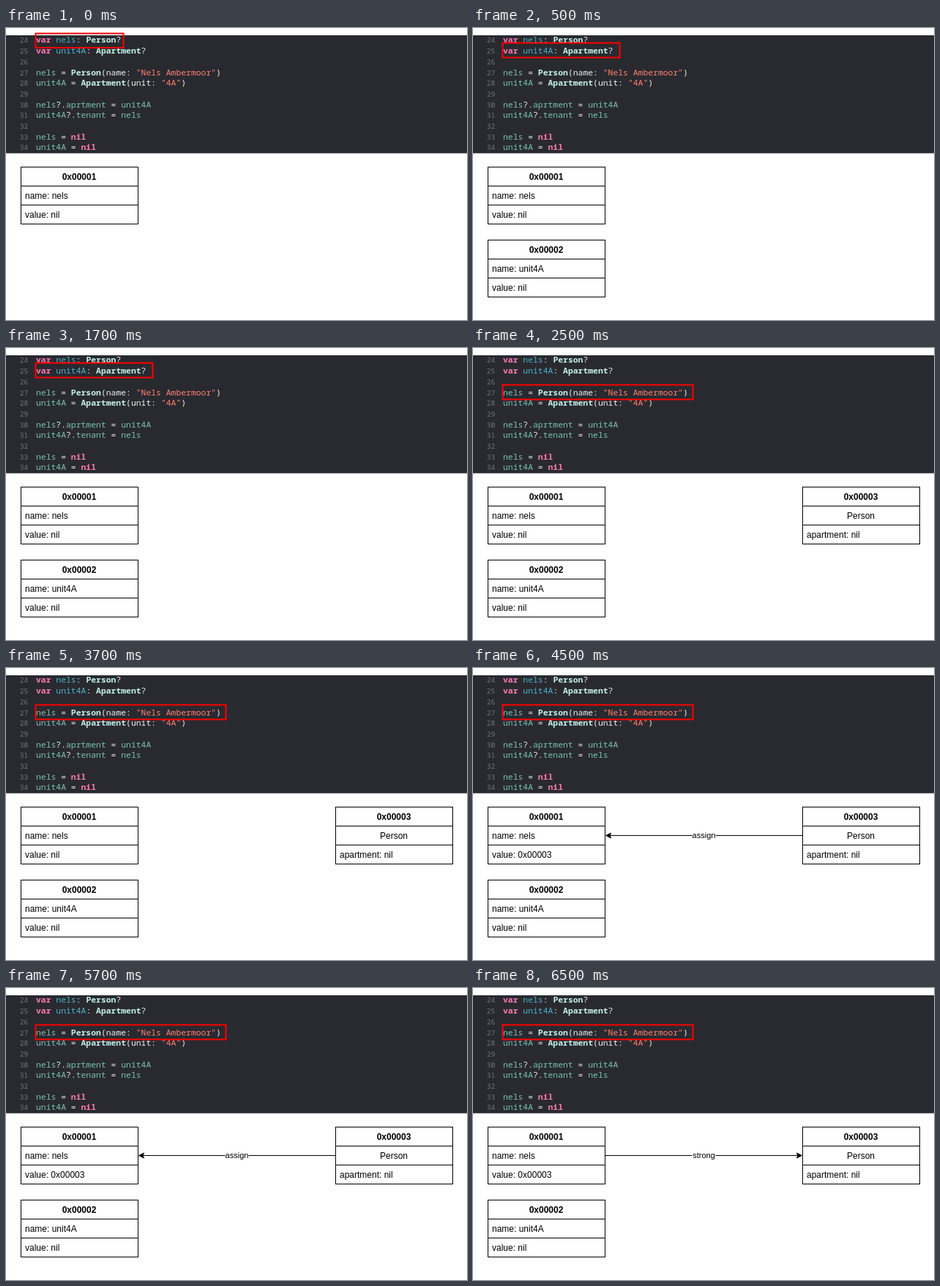
These frames come from a looping animation (630x400 px, 8 s). An HTML page:

```html
<!DOCTYPE html>
<html lang="en">
<head>
<meta charset="utf-8">
<title>Reference counting, step by step</title>
<style>
  html, body { margin: 0; width: 100%; height: 100%; overflow: hidden; background: #fff; }
  svg { display: block; width: 630px; height: 400px; }
  text { white-space: pre; }
  .code { font: 500 11.4px "Noto Sans Mono", "DejaVu Sans Mono", monospace; fill: #f2f2f3; }
  .num { font: 400 9.6px "Noto Sans Mono", "DejaVu Sans Mono", monospace; fill: #747478; text-anchor: end; }
  .k { fill: #ff7ab2; font-weight: 700; }
  .d { fill: #4eb0cc; }
  .v { fill: #78c2b3; }
  .t { fill: #c4f2e9; font-weight: 600; }
  .s { fill: #ff8170; }
  .cell { font: 12px "Liberation Sans", Arial, sans-serif; }
  .head { font-weight: 700; }
  .mid { text-anchor: middle; }
  .label { font: 11px "Liberation Sans", Arial, sans-serif; text-anchor: middle; }
  .line { fill: none; stroke: #000; }
  .mark { fill: none; stroke: #f00; stroke-width: 2; }
</style>
</head>
<body>
<svg id="stage" viewBox="0 0 630 400"></svg>
<script>
const LOOP = 8000;
const stage = document.getElementById("stage");

// Each token is "class|text"; an empty class means plain text.
const code = [
  ["k|var", "| ", "d|nels", "|: ", "t|Person", "|?"],
  ["k|var", "| ", "d|unit4A", "|: ", "t|Apartment", "|?"],
  [],
  ["v|nels", "| = ", "t|Person", "|(name: ", 's|"Nels Ambermoor"', "|)"],
  ["v|unit4A", "| = ", "t|Apartment", "|(unit: ", 's|"4A"', "|)"],
  [],
  ["v|nels", "|?.", "v|aprtment", "| = ", "v|unit4A"],
  ["v|unit4A", "|?.", "v|tenant", "| = ", "v|nels"],
  [],
  ["v|nels", "| = ", "k|nil"],
  ["v|unit4A", "| = ", "k|nil"]
];

const steps = [
  { at: 0, mark: [40.5, 7.5, 120, 19.5] },
  { at: 500, mark: [40.5, 20.5, 160, 20], unit: true },
  { at: 2500, mark: [40.5, 50.5, 260, 20], unit: true, person: true },
  { at: 4500, mark: [40.5, 50.5, 260, 20], unit: true, person: true, value: "0x00003", link: "assign", left: true },
  { at: 6500, mark: [40.5, 50.5, 260, 20], unit: true, person: true, value: "0x00003", link: "strong" }
];

const text = (cls, x, y, body) => `<text class="${cls}" x="${x}" y="${y}">${body}</text>`;

const rect = (cls, [x, y, w, h]) =>
  `<rect class="${cls}" x="${x}" y="${y}" width="${w}" height="${h}"/>`;

function codePanel() {
  const rows = code.map((tokens, i) => {
    const y = (20.4 + i * 14.7).toFixed(1);
    const body = tokens.map(token => {
      const [cls, word] = token.split("|");
      return `<tspan class="${cls}">${word}</tspan>`;
    }).join("");
    return text("num", 30.3, y, 24 + i) + text("code", 41, y, body);
  });
  return '<rect y="10" width="630" height="161.6" fill="#292a30"/>' + rows.join("");
}

function table(x, y, title, first, second, centred) {
  return rect("line", [x + .5, y + .5, 160, 78]) +
    `<path class="line" d="M${x + .5} ${y + 26.5}h160m-160 26h160"/>` +
    text("cell head mid", x + 80, y + 18, title) +
    (centred ? text("cell mid", x + 80, y + 44, first) : text("cell", x + 6, y + 44, first)) +
    text("cell", x + 6, y + 70, second);
}

function arrow(label, left) {
  const y = 229.5;
  const tip = left ? 181.6 : 449.4;
  const dir = left ? 1 : -1;
  const notch = tip + dir * 5.25;
  const back = tip + dir * 7;
  return `<path class="line" d="M${left ? 450.5 : 180.5} ${y}H${notch}"/>` +
    `<path d="M${tip} ${y}L${back} ${y + 3.5}L${notch} ${y}L${back} ${y - 3.5}Z" stroke="#000"/>` +
    rect("", [299.5, 222, 32, 15]).replace("<rect", '<rect fill="#fff"') +
    text("label", 315.5, 233, label);
}

function scene(s) {
  return rect("mark", s.mark) +
    table(20, 190, "0x00001", "name: nels", "value: " + (s.value || "nil")) +
    (s.unit ? table(20, 290, "0x00002", "name: unit4A", "value: nil") : "") +
    (s.person ? table(450, 190, "0x00003", "Person", "apartment: nil", true) : "") +
    (s.link ? arrow(s.link, s.left) : "");
}

stage.innerHTML = codePanel() + steps.map(s => `<g>${scene(s)}</g>`).join("");
const groups = [...stage.querySelectorAll("g")];
const start = performance.now();

function draw(now) {
  const t = Math.max(0, now - start) % LOOP;
  const current = steps.filter(s => s.at <= t).length - 1;
  groups.forEach((g, i) => g.setAttribute("display", i === current ? "inline" : "none"));
  requestAnimationFrame(draw);
}
draw(start);
</script>
</body>
</html>
```
